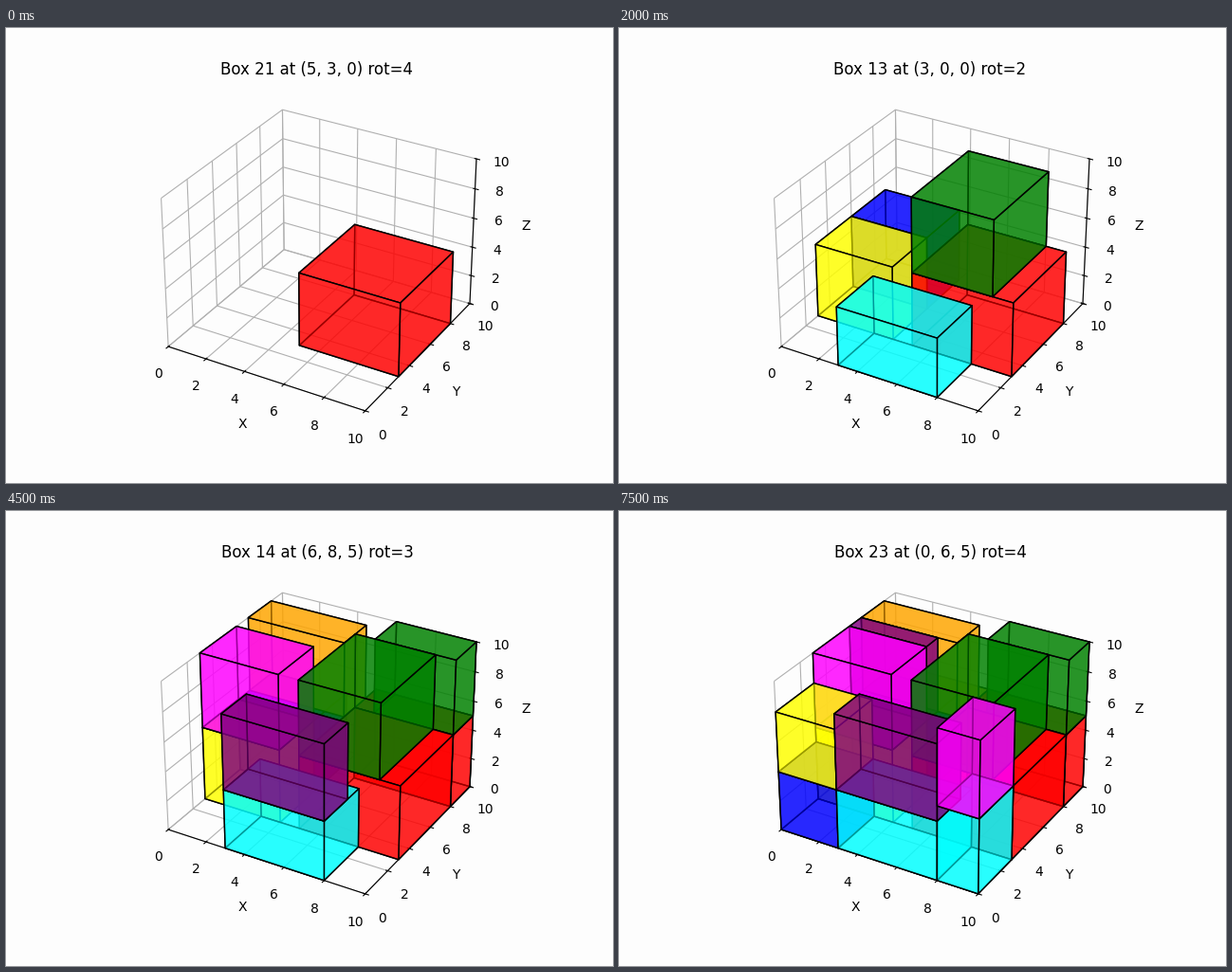
Animation, 640 px wide and 480 px high, one loop 8 s. Source, as a matplotlib script:

```python
from itertools import cycle

import matplotlib.pyplot as plt
from matplotlib.animation import FuncAnimation
from mpl_toolkits.mplot3d.art3d import Poly3DCollection

BACKGROUND = "#fdfdfd"
COLORS = cycle(["red", "green", "blue", "yellow",
                "cyan", "magenta", "orange", "purple"])
SIZE = 10

# Floor plots of the container: (x0, y0, x1, y1)
RIGHT = (5, 3, SIZE, 8)
RIGHT_BACK = (5, 8, SIZE, SIZE)
LEFT_FRONT = (0, 0, 3, 3)
LEFT = (0, 3, 4, 6)
LEFT_BACK = (0, 6, 4, 9)
FRONT = (3, 0, 8, 3)
CORNER = (8, 0, SIZE, 3)
BACK = (0, 9, 5, SIZE)

fig = plt.figure(figsize=(6.4, 4.8), dpi=100, facecolor=BACKGROUND)
ax = fig.add_subplot(111, projection="3d", facecolor=BACKGROUND)
for axis in (ax.xaxis, ax.yaxis, ax.zaxis):
    axis.set_pane_color((1, 1, 1, 0))

bounds, solids, labels = [], [], []


def overlaps(a, b):
    return a[0] < b[2] and b[0] < a[2] and a[1] < b[3] and b[1] < a[3]


def box_faces(rect, z0, z1):
    x0, y0, x1, y1 = rect
    corners = [(x0, y0), (x1, y0), (x1, y1), (x0, y1)]
    bottom, top = ([(x, y, z) for x, y in corners] for z in (z0, z1))
    sides = [[bottom[i - 1], bottom[i], top[i], top[i - 1]] for i in range(4)]
    return [bottom, top] + sides


def place(number, rot, plot, height=5, left=0, right=0, front=0, back=0):
    """Drop a box on a plot, inset from its edges, onto whatever lies below."""
    x0, y0, x1, y1 = plot
    rect = (x0 + left, y0 + front, x1 - right, y1 - back)
    z = max((top for other, top in bounds if overlaps(rect, other)), default=0)
    solid = Poly3DCollection(box_faces(rect, z, z + height),
                             facecolors=next(COLORS), edgecolors="black",
                             linewidths=1, alpha=0.6)
    ax.add_collection3d(solid)
    bounds.append((rect, z + height))
    solids.append(solid)
    labels.append(f"Box {number} at ({rect[0]}, {rect[1]}, {z}) rot={rot}")


place(21, 4, RIGHT)
place(4, 4, RIGHT, right=1)
place(7, 2, LEFT_BACK)
place(18, 0, LEFT)
place(13, 2, FRONT, height=4)
place(19, 0, LEFT)
place(16, 0, LEFT_BACK, front=1, right=-1)
place(12, 2, FRONT, back=1)
place(15, 2, RIGHT_BACK)
place(14, 3, RIGHT_BACK, left=1)
place(40, 3, LEFT_FRONT, height=4)
place(41, 5, LEFT_FRONT, height=4)
place(32, 4, CORNER)
place(33, 0, CORNER)
place(22, 2, BACK)
place(23, 4, LEFT_BACK, back=2)

limits = (0, SIZE)
ax.set(xlim=limits, ylim=limits, zlim=limits,
       xlabel="X", ylabel="Y", zlabel="Z")
title = ax.set_title("")


def update(step):
    for i, solid in enumerate(solids):
        solid.set_visible(i <= step)
    title.set_text(labels[step])
    return [*solids, title]


anim = FuncAnimation(fig, update, frames=len(solids), interval=500,
                     init_func=lambda: update(0), repeat=True, repeat_delay=0)
plt.show()
```
